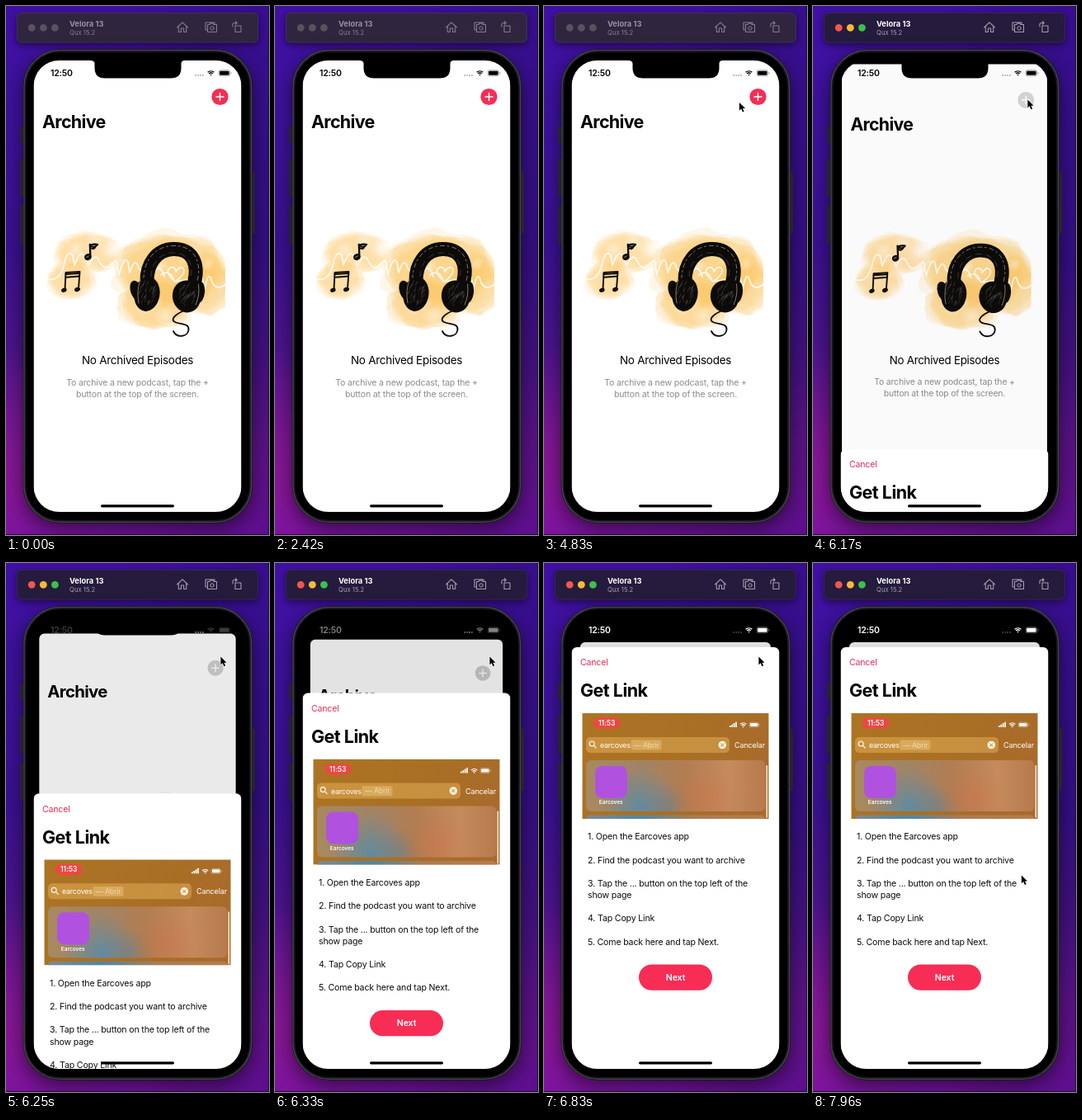
Animation of 319x641 px, one loop 8 s. Source, as an HTML page with a canvas:

```html
<!DOCTYPE html>
<html lang="en">
<head>
<meta charset="utf-8">
<title>Archive app</title>
<style>
  html, body { margin: 0; width: 100%; height: 100%; overflow: hidden; background: #2c0d68; }
  canvas { display: block; width: 319px; height: 641px; }
</style>
</head>
<body>
<canvas id="stage"></canvas>
<script>
const W = 319, H = 641, LOOP = 8000;
const canvas = document.getElementById('stage');
const ratio = window.devicePixelRatio || 1;
canvas.width = W * ratio;
canvas.height = H * ratio;
const ctx = canvas.getContext('2d');

const PINK = '#f72d56', INK = '#0d0b09';
const SCREEN = { x: 33.5, y: 66, w: 252, h: 547, r: 31 };
const SHEET_TOP = 102;

const clamp = v => Math.max(0, Math.min(1, v));
const mix = (a, b, k) => a + (b - a) * k;
const span = (t, a, b) => clamp((t - a) / (b - a));
const smooth = k => k * k * (3 - 2 * k);
const mixRgb = (a, b, k) => `rgb(${a.map((v, i) => Math.round(mix(v, b[i], k)))})`;

function random(seed) {
  return () => {
    seed = (seed * 16807) % 2147483647;
    return seed / 2147483647;
  };
}

function rect(x, y, w, h, r, fill) {
  ctx.beginPath();
  ctx.roundRect(x, y, w, h, r);
  ctx.fillStyle = fill;
  ctx.fill();
}

function disc(x, y, r, fill) {
  ctx.beginPath();
  ctx.arc(x, y, r, 0, 7);
  ctx.fillStyle = fill;
  ctx.fill();
}

function oval(x, y, rx, ry, angle, fill) {
  ctx.beginPath();
  ctx.ellipse(x, y, rx, ry, angle, 0, 7);
  ctx.fillStyle = fill;
  ctx.fill();
}

function line(d, color, width) {
  ctx.strokeStyle = color;
  ctx.lineWidth = width;
  ctx.lineCap = ctx.lineJoin = 'round';
  ctx.stroke(new Path2D(d));
}

function text(str, x, y, size, color, weight = 400, track = -0.018, align = 'left') {
  ctx.font = `${weight} ${size}px Inter, Roboto, sans-serif`;
  ctx.letterSpacing = size * track + 'px';
  ctx.textAlign = align;
  ctx.fillStyle = color;
  ctx.fillText(str, x, y);
}

function gradient(x0, y0, x1, y1, stops) {
  const g = ctx.createLinearGradient(x0, y0, x1, y1);
  stops.forEach(([at, color]) => g.addColorStop(at, color));
  return g;
}

function glow(x, y, r, rgb, alpha) {
  const g = ctx.createRadialGradient(x, y, 0, x, y, r);
  g.addColorStop(0, `rgba(${rgb},${alpha})`);
  g.addColorStop(1, `rgba(${rgb},0)`);
  ctx.fillStyle = g;
  ctx.fillRect(x - r, y - r, 2 * r, 2 * r);
}

function withShadow(alpha, blur, drop, paint) {
  ctx.save();
  ctx.shadowColor = `rgba(0,0,0,${alpha})`;
  ctx.shadowBlur = blur * ratio;
  ctx.shadowOffsetY = drop * ratio;
  paint();
  ctx.restore();
}

function drawWallpaper() {
  ctx.fillStyle = gradient(0, 0, 0, H, [
    [0, '#400fa4'], [0.2, '#3d129e'], [0.45, '#391192'], [0.65, '#4c148e'],
    [0.82, '#6f1698'], [0.92, '#7a14a0'], [1, '#7411a2']
  ]);
  ctx.fillRect(0, 0, W, H);
  glow(0, 560, 150, '160,26,146', 0.45);
  ctx.fillStyle = gradient(150, 0, W, 0, [[0, 'rgba(36,8,96,0)'], [1, 'rgba(36,8,96,.3)']]);
  ctx.fillRect(0, 0, W, H);
  ctx.fillStyle = '#1c1230';
  ctx.fillRect(0, 640, W, 1);
  ctx.fillRect(318, 0, 1, H);
}

function drawToolbar(active) {
  withShadow(0.5, 10, 3, () => rect(13, 8, 293, 36.5, 6, active ? '#251b3c' : '#30253e'));
  ctx.beginPath();
  ctx.roundRect(13.4, 8.4, 292.2, 35.7, 6);
  ctx.strokeStyle = 'rgba(255,255,255,.1)';
  ctx.lineWidth = 0.7;
  ctx.stroke();
  const lights = active ? ['#f2564f', '#f4bb35', '#3ac24a'] : ['#5a515f', '#5a515f', '#5a515f'];
  lights.forEach((color, i) => disc(31.2 + i * 14.1, 26.3, 4.4, color));
  text('Velora 13', 77, 25, 9.3, active ? '#fff' : '#98909f', 700, 0);
  text('Qux 15.2', 77, 34.6, 7.7, active ? '#a69eb2' : '#867e8e', 400, 0);

  const ink = active ? '#a39cb0' : '#837b8c';
  line('M207.5 26L214 19.8L220.5 26M209.3 25V31.5H212.4V27H215.6V31.5H218.7V25', ink, 1.1);
  line('M243.5 29H242V20H253V21.5M244.5 22.5H247L248 21H251L252 22.5H255.5V31.5H244.5Z', ink, 1.1);
  line('M252.2 27A2.2 2.2 0 1 1 247.8 27A2.2 2.2 0 1 1 252.2 27', ink, 1);
  line('M278 24H285V31.5H278ZM275 25V22.5Q275 20.5 277 20.5H280M278.3 18.6L280.2 20.5L278.3 22.4', ink, 1.1);
}

function drawPhone() {
  withShadow(0.55, 26, 8, () => rect(20.8, 52.5, 278, 574, 45, '#17161b'));
  [[17, 146, 20], [17, 185, 46], [17, 242, 46], [297, 201, 75]].forEach(([x, y, h]) =>
    rect(x, y, 5, h, 1.5, '#262430'));
  rect(20.8, 52.5, 278, 574, 45, '#17161b');
  ctx.beginPath();
  ctx.roundRect(22, 53.7, 275.6, 571.6, 44);
  ctx.strokeStyle = '#46454c';
  ctx.lineWidth = 1.3;
  ctx.stroke();
  rect(24.5, 56.2, 270.5, 566.6, 41, '#000');
}

function drawNotch() {
  ctx.fillStyle = '#000';
  ctx.fill(new Path2D('M102 65H217V66Q212.5 66 212.5 70V75Q212.5 87.5 200 87.5H120Q107.5 87.5 107.5 75V70Q107.5 66 102 66Z'));
}

function drawWifi(x, y, s, color) {
  ctx.fillStyle = color;
  ctx.beginPath();
  ctx.moveTo(x, y);
  ctx.arc(x, y, 1.8 * s, -2.3, -0.84);
  ctx.fill();
  ctx.strokeStyle = color;
  ctx.lineWidth = 1.4 * s;
  ctx.lineCap = 'butt';
  [3.6, 6.1].forEach(r => {
    ctx.beginPath();
    ctx.arc(x, y, r * s, -2.3, -0.84);
    ctx.stroke();
  });
}

function drawBattery(x, y, w, h, color) {
  ctx.beginPath();
  ctx.roundRect(x, y, w, h, 2);
  ctx.globalAlpha = 0.45;
  ctx.strokeStyle = color;
  ctx.lineWidth = 0.7;
  ctx.stroke();
  rect(x + w + 0.9, y + h / 3, 0.9, h / 3, 0.4, color);
  ctx.globalAlpha = 1;
  rect(x + 1, y + 1, w - 2, h - 2, 1.2, color);
}

function drawStatus(light) {
  const color = mixRgb([0, 0, 0], [255, 255, 255], light);
  text('12:50', 54, 85, 10.5, color, 600, -0.02);
  for (let i = 0; i < 4; i++) disc(230.2 + i * 2.9, 84, 0.9, mixRgb([165, 165, 165], [75, 75, 75], light));
  drawWifi(248.5, 84.6, 0.95, color);
  drawBattery(258, 77.8, 13.6, 7, color);
}

// Layered translucent outlines give the watercolour edge.
function wash(x, y, rx, ry, seed, rgb, layers) {
  const rnd = random(seed);
  ctx.fillStyle = `rgba(${rgb},.15)`;
  for (let n = 0; n < layers; n++) {
    const size = 1.06 - 0.3 * n / layers;
    const phase = [rnd() * 6, rnd() * 6, rnd() * 6];
    ctx.beginPath();
    for (let i = 0; i < 60; i++) {
      const a = i / 60 * Math.PI * 2;
      const r = size * (1 + 0.06 * Math.sin(3 * a + phase[0]) + 0.045 * Math.sin(7 * a + phase[1])
        + 0.025 * Math.sin(13 * a + phase[2]) + 0.03 * (rnd() - 0.5));
      ctx.lineTo(x + rx * r * Math.cos(a), y + ry * r * Math.sin(a));
    }
    ctx.fill();
  }
}

function mottle(count, seed) {
  const rnd = random(seed);
  for (let i = 0; i < count; i++) {
    glow(mix(52, 262, rnd()), mix(276, 385, rnd()), mix(8, 18, rnd()), '255,255,255', 0.4);
  }
}

function scratches(x, y, rx, ry, count, seed) {
  const rnd = random(seed);
  for (let i = 0; i < count; i++) {
    const a = rnd() * 6.3, r = Math.sqrt(rnd()) * 0.8;
    const px = x + Math.cos(a) * rx * r, py = y + Math.sin(a) * ry * r;
    const len = 2 + rnd() * 4;
    line(`M${px} ${py}l${len * 0.45} ${-len}`, 'rgba(215,210,200,.32)', 0.5);
  }
}

function drawNotes() {
  line('M71.5 343L72.5 323L89.5 322L88 342', INK, 1.9);
  line('M72.5 325L89 324M72.4 328.8L89 327.6', INK, 2);
  oval(70.3, 344.3, 3.4, 2.5, -0.4, INK);
  oval(86.5, 343.3, 3.6, 2.6, -0.4, INK);
  line('M102.4 304L101.8 289Q106 295 111 289Q107 288 102 290', INK, 2.3);
  line('M102.5 293Q107 296 109 291', INK, 2);
  oval(99.3, 304.2, 4.2, 3.8, -0.5, INK);
  line('M97.6 304.6l2.6 -1.6', '#f5dfa8', 0.7);
}

function drawHeadphones() {
  line('M171 334C170.5 312 183 295 203 294.5C226 294 234 312 228.5 335', INK, 17);
  ctx.setLineDash([5, 3.5, 2, 4]);
  line('M167 331C167 308 181 291 203 290.5C228 290 238 310 232 333', 'rgba(240,232,215,.7)', 0.7);
  ctx.setLineDash([7, 6]);
  line('M176 328C176 312 187 299 203 299C219 299 228 311 224 328', 'rgba(200,192,180,.4)', 0.6);
  ctx.setLineDash([]);

  oval(158, 345, 7, 12.5, -0.3, INK);
  oval(171, 349, 15.5, 21, 0.15, INK);
  oval(235.5, 347, 5.5, 12.5, 0.12, INK);
  oval(219, 352, 17, 19.5, -0.2, INK);
  scratches(171, 349, 13, 18, 30, 71);
  scratches(218, 352, 14, 16, 30, 913);
  line('M163 332Q158 345 161 360M233.5 337Q235.5 350 230 362', 'rgba(250,235,200,.7)', 0.7);

  line('M214 370C205 374 199 380 205 383C211 386 222 384 221.5 392C221 401 207 403 203 394', INK, 1.9);
}

function drawArtwork() {
  ctx.save();
  ctx.beginPath();
  ctx.rect(46, 268, 220, 136);
  ctx.clip();
  wash(99, 299, 39, 24, 17, '250,208,126', 7);
  wash(79, 332, 28, 23, 411, '250,208,126', 7);
  wash(199, 320, 66, 44, 55, '248,202,110', 9);
  wash(181, 361, 44, 30, 802, '246,196,98', 6);
  wash(240, 338, 33, 36, 1291, '246,196,98', 5);
  mottle(18, 5);
  line('M48 330Q64 336 70 315Q74 294 81 302L83 314Q91 292 96 305L100 314Q108 299 112 307'
    + 'Q119 322 126 314L134 308L137 326Q144 300 148 311L150 323Q157 302 161 318'
    + 'Q170 328 181 320Q188 313 192 328', 'rgba(255,255,255,.85)', 1.7);
  line('M188 326Q199 318 204 333Q192 322 199 317Q205 315 206 322Q211 313 216 319Q217 326 205 334'
    + 'Q226 331 237 326L241 343Q246 317 250 335Q256 346 266 337', 'rgba(255,255,255,.85)', 1.7);
  ctx.restore();
  drawNotes();
  drawHeadphones();
}

function drawArchive(t, shown) {
  ctx.save();
  ctx.translate(159.5, SCREEN.y + 30 * shown);
  const scale = 1 - 0.083 * shown;
  ctx.scale(scale, scale);
  ctx.translate(-159.5, -SCREEN.y);
  rect(SCREEN.x, SCREEN.y, SCREEN.w, SCREEN.h, shown > 0 ? 6.5 : 0, '#fff');

  const grey = mix(216, 203, shown);
  disc(259.5, 110, 10.1, mixRgb([246, 45, 85], [grey, grey, grey], span(t, 6040, 6150)));
  line('M255 110H264M259.5 105.5V114.5', '#fff', 1.6);
  text('Archive', 44, 147.8, 21.5, '#000', 700, -0.032);
  drawArtwork();
  text('No Archived Episodes', 159.5, 433.8, 13.5, '#000', 400, -0.02, 'center');
  text('To archive a new podcast, tap the +', 159.5, 459.6, 10.6, '#8c8c90', 400, -0.017, 'center');
  text('button at the top of the screen.', 159.5, 473.8, 10.6, '#8c8c90', 400, -0.017, 'center');
  if (shown > 0) rect(SCREEN.x, SCREEN.y, SCREEN.w, SCREEN.h, 6.5, `rgba(0,0,0,${0.125 * shown})`);
  ctx.restore();
}

// Coordinates below are measured from the top of the sheet.
function drawScreenshot() {
  ctx.save();
  ctx.beginPath();
  ctx.rect(46.5, 80, 226, 128);
  ctx.clip();
  ctx.fillStyle = gradient(46, 80, 272, 208, [[0, '#ae7424'], [0.5, '#a96f24'], [1, '#a9692f']]);
  ctx.fillRect(46, 80, 227, 128);
  rect(51, 137, 217.5, 62, 6, gradient(51, 0, 268, 0, [
    [0, '#a8895f'], [0.3, '#a08467'], [0.55, '#b27d51'], [0.8, '#c58b5c'], [1, '#b67a4c']
  ]));
  ctx.save();
  ctx.beginPath();
  ctx.roundRect(51, 137, 217.5, 62, 6);
  ctx.clip();
  glow(116, 194, 48, '70,142,184', 0.7);
  glow(150, 196, 32, '90,128,150', 0.4);
  glow(196, 184, 40, '208,112,72', 0.45);
  ctx.restore();
  rect(51, 203.5, 217.5, 12, 5, gradient(51, 0, 268, 0, [
    [0, '#80888a'], [0.3, '#4f87a2'], [0.6, '#a77d57'], [1, '#b77c4b']
  ]));
  rect(269.5, 143, 1.6, 64, 0.8, 'rgba(255,245,225,.9)');

  rect(60, 85.6, 32.5, 13, 6.5, '#ee4742');
  text('11:53', 76.2, 95.1, 8.6, '#fff', 600, -0.01, 'center');
  [2, 3.5, 5, 6.5].forEach((h, i) => rect(225 + i * 2.4, 97 - h, 1.7, h, 0.4, '#fff'));
  drawWifi(241.7, 97.4, 0.9, '#fff');
  drawBattery(249, 91, 11.5, 6, '#fff');

  rect(51, 109, 174, 19, 5, 'rgba(238,190,100,.42)');
  line('M61.2 117A3 3 0 1 1 55.2 117A3 3 0 1 1 61.2 117M60.5 119.2L63.2 122', '#fff', 1.1);
  rect(105.5, 112.6, 37, 12, 2, 'rgba(255,226,165,.3)');
  text('earcoves', 68, 122, 9, '#fff', 400, -0.03);
  text('— Abrir', 109, 121.6, 8.8, '#f0d9a8', 400, -0.02);
  disc(216.3, 118.5, 4.8, '#fbf0db');
  line('M214.6 116.8l3.4 3.4m0 -3.4l-3.4 3.4', '#b18440', 1);
  text('Cancelar', 231, 122, 9.1, '#fff', 400, -0.02);
  rect(62, 144, 39, 39, 8.5, '#b052df');
  text('Earcoves', 81.2, 190.3, 6.5, '#fff', 600, 0, 'center');
  ctx.restore();
}

const STEPS = [
  [233.4, '1. Open the Earcoves app'],
  [261.8, '2. Find the podcast you want to archive'],
  [290, '3. Tap the ... button on the top left of the'],
  [304.2, 'show page'],
  [332.3, '4. Tap Copy Link'],
  [360.7, '5. Come back here and tap Next.']
];

function drawSheet(top) {
  ctx.save();
  ctx.translate(0, top);
  rect(SCREEN.x, 0, SCREEN.w, 560, 6.5, '#fff');
  text('Cancel', 44, 22.2, 10.6, '#e3305a');
  text('Get Link', 44, 60.2, 21.5, '#000', 700, -0.025);
  drawScreenshot();
  STEPS.forEach(([y, label]) => text(label, 53, y, 10.6, '#0c0c0e', 400, -0.016));
  rect(115, 384.5, 89, 31.2, 15.6, PINK);
  text('Next', 159.5, 403.8, 10.6, '#fff', 600, -0.01, 'center');
  ctx.restore();
}

function pointerAt(t) {
  if (t < 4330) return null;
  if (t < 4830) {
    const k = span(t, 4330, 4830);
    const out = 1 - (1 - k) * (1 - k);
    return [mix(-8, 236.5, out), mix(215, 116.5, out)];
  }
  if (t < 6900) {
    const k = smooth(span(t, 4830, 5250));
    return [mix(236.5, 260, k), mix(116.5, 113.2, k)];
  }
  const k = smooth(span(t, 6900, 7900));
  return [mix(260, 252.5, k), mix(113.2, 378, k)];
}

function drawPointer(x, y) {
  ctx.save();
  ctx.translate(x, y);
  const arrow = 'M0.4 0.4V10.2L2.7 8.1L4.4 12.1L6.2 11.3L4.5 7.5H7.6Z';
  line(arrow, '#fff', 1.3);
  ctx.fillStyle = '#000';
  ctx.fill(new Path2D(arrow));
  ctx.restore();
}

// Critically damped spring, 1 at rest.
function springIn(t, start) {
  const s = Math.max(0, t - start) / 1000 * 19.4;
  return 1 - (1 + s) * Math.exp(-s);
}

function draw(t) {
  const shown = springIn(t, 6136);
  ctx.setTransform(ratio, 0, 0, ratio, 0, 0);
  drawWallpaper();
  drawToolbar(t >= 6000);
  drawPhone();

  ctx.save();
  ctx.beginPath();
  ctx.roundRect(SCREEN.x, SCREEN.y, SCREEN.w, SCREEN.h, SCREEN.r);
  ctx.clip();
  drawArchive(t, shown);
  drawStatus(span(t, 6180, 6480));
  if (shown > 0) drawSheet(mix(SCREEN.y + SCREEN.h, SHEET_TOP, shown));
  rect(115, 604.2, 89, 3.2, 1.6, '#000');
  ctx.restore();
  drawNotch();

  const pointer = pointerAt(t);
  if (pointer) drawPointer(...pointer);
}

function tick() {
  draw(performance.now() % LOOP);
  requestAnimationFrame(tick);
}
tick();
</script>
</body>
</html>
```
